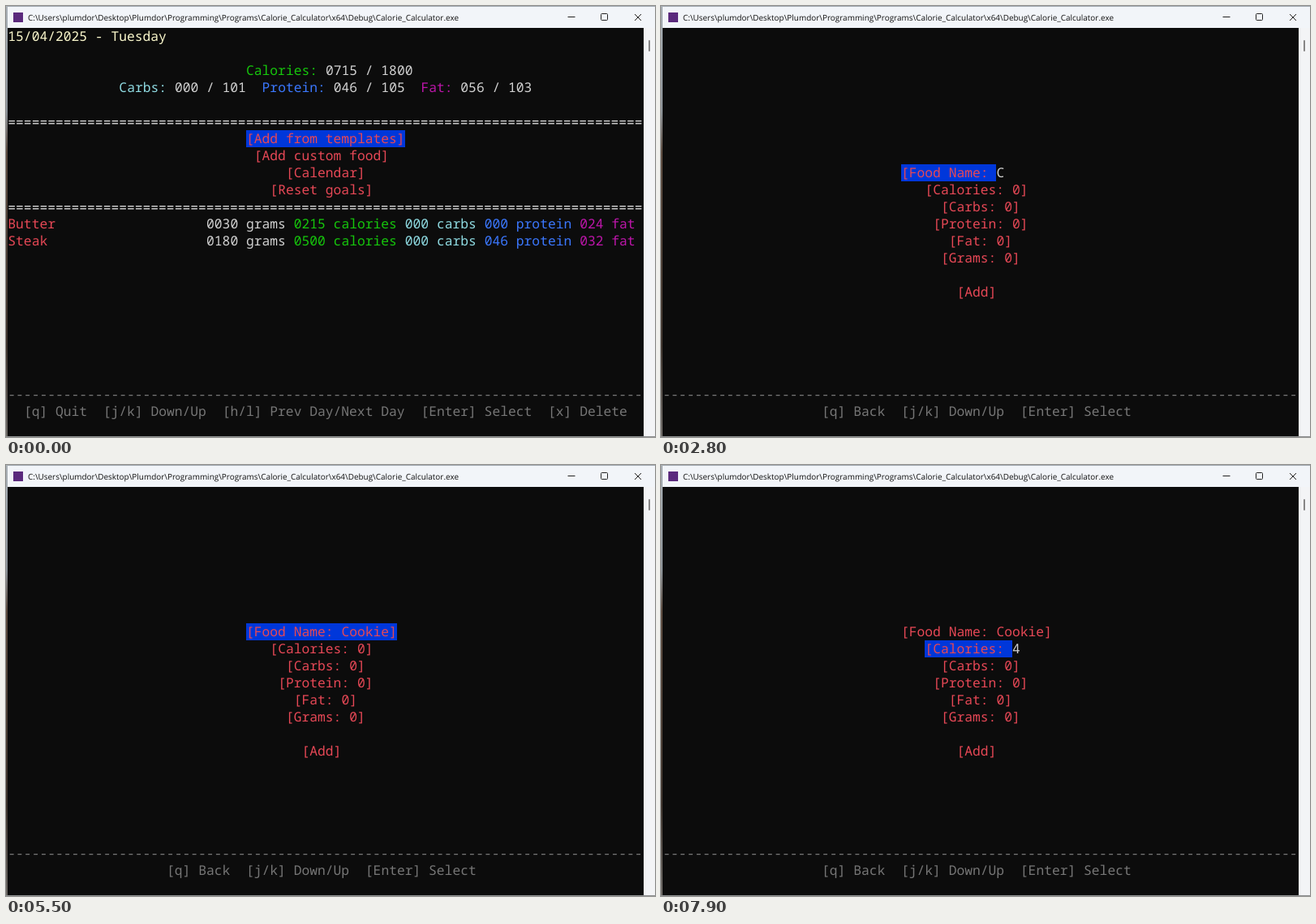
An HTML page for the animation above (8 s loop, 800 px wide and 531 px high).

```html
<!DOCTYPE html>
<html lang="en">
<head>
<meta charset="utf-8">
<title>Calorie calculator</title>
<style>
  html, body { margin: 0; width: 100%; height: 100%; overflow: hidden; }
  body { position: relative; background: #f3f4f6; text-rendering: geometricPrecision; }

  /* window frame */
  .frame, .frame * { position: absolute; }
  .caption { left: 0; top: 0; width: 800px; height: 27px; background: #f2f5f9; }
  .top { left: 0; top: 0; width: 800px; height: 1px; background: #a3abb2; }
  .left { left: 0; top: 0; width: 2px; height: 531px;
    background: linear-gradient(#a9b0b6, #8b9196 130px, #5b4a3e 180px, #3d332c 420px, #6d6a66); }
  .bottom { left: 0; top: 530px; width: 800px; height: 1px; background: #8d8f90; }
  .icon { left: 9px; top: 8px; width: 12px; height: 12px; background: #5b2a7d; }
  .path { left: 27px; top: 5px; font: 9.95px/18px "Open Sans", sans-serif; color: #111; white-space: pre; }
  .thumb { left: 792px; top: 42px; width: 2px; height: 14px; border-radius: 1px; background: #868686; }
  .buttons { left: 0; top: 0; fill: none; stroke: #222; }

  /* terminal: an 80-column grid */
  .term { --w: 9.79px; --h: 21px; position: absolute; left: 2px; top: 27px; width: 784px; height: 503px;
    overflow: hidden; background: #0c0c0c; color: #d2d2d2;
    font: 16.3167px/21px "Noto Sans Mono", "DejaVu Sans Mono", monospace; }
  .term section { position: absolute; inset: 0; }
  .term p, .bar { position: absolute; margin: 0; height: var(--h); white-space: pre;
    left: calc(.3px + var(--c, 0) * var(--w)); top: calc(var(--r) * var(--h)); }
  .bar { width: calc(var(--n) * var(--w)); background: #0037da; }
  .term .rule { margin-top: 1px; color: #e6e6e6; }
  .red { color: #e74856; }
  .green { color: #16c60c; }
  .cyan { color: #8fdbe2; }
  .blue { color: #3b78ff; }
  .pink { color: #bd16aa; }
  .gold { color: #fbf8cc; }
  .dim { color: #767676; }

  /* timeline */
  .day, .form, .bar, .typed, .empty, .close, .zero, .digit { animation: 8s step-end infinite; }
  .day { animation-name: day; }
  .form { animation-name: form; }
  .day .bar { animation-name: menu; }
  .form .bar { animation-name: field; }
  .typed { animation-name: type; overflow: hidden; }
  .empty { animation-name: empty; }
  .close { animation-name: close; }
  .zero { animation-name: zero; }
  .digit { animation-name: digit; }

  @keyframes day { 0% { opacity: 1 } 12.5%, 100% { opacity: 0 } }
  @keyframes form { 0% { opacity: 0 } 12.5%, 100% { opacity: 1 } }
  @keyframes menu {
    0% { --c: 30; --r: 6; --n: 20 }
    1.25%, 100% { --c: 31; --r: 7; --n: 17 }
  }
  @keyframes field {
    0% { --c: 30; --r: 8; --n: 20 }
    25% { --c: 30; --r: 8; --n: 12 }
    63.75% { --c: 30; --r: 8; --n: 19 }
    71.25% { --c: 33; --r: 9; --n: 13 }
    83.75%, 100% { --c: 33; --r: 9; --n: 11 }
  }
  @keyframes type {
    0% { width: 0; color: #d2d2d2 }
    31.25% { width: calc(1 * var(--w)); color: #d2d2d2 }
    38.75% { width: calc(2 * var(--w)); color: #d2d2d2 }
    43.75% { width: calc(3 * var(--w)); color: #d2d2d2 }
    50% { width: calc(4 * var(--w)); color: #d2d2d2 }
    53.75% { width: calc(5 * var(--w)); color: #d2d2d2 }
    57.5% { width: calc(6 * var(--w)); color: #d2d2d2 }
    63.75%, 100% { width: calc(6 * var(--w)); color: #e74856 }
  }
  @keyframes empty { 0% { opacity: 1 } 25%, 100% { opacity: 0 } }
  @keyframes close { 0% { opacity: 0 } 63.75%, 100% { opacity: 1 } }
  @keyframes zero { 0% { opacity: 1 } 83.75%, 100% { opacity: 0 } }
  @keyframes digit { 0% { opacity: 0 } 92.5%, 100% { opacity: 1 } }
</style>
</head>
<body>
<div class="frame">
  <div class="caption"></div>
  <div class="top"></div>
  <div class="left"></div>
  <div class="bottom"></div>
  <div class="icon"></div>
  <div class="path">C:\Users\plumdor\Desktop\Plumdor\Programming\Programs\Calorie_Calculator\x64\Debug\Calorie_Calculator.exe</div>
  <svg class="buttons" width="800" height="27">
    <path d="M692.5 13.5h9"/>
    <rect x="733.5" y="9.5" width="8" height="8" rx="1"/>
    <path d="M775 10l8 8m0-8l-8 8"/>
  </svg>
  <div class="thumb"></div>
</div>

<main class="term">
  <section class="day">
    <div class="bar"></div>
    <p class="gold" style="--r:0">15/04/2025 - Tuesday</p>

    <p class="green" style="--r:2;--c:30">Calories:</p>
    <p style="--r:2;--c:40">0715 / 1800</p>
    <p class="cyan" style="--r:3;--c:14">Carbs:</p>
    <p style="--r:3;--c:21">000 / 101</p>
    <p class="blue" style="--r:3;--c:32">Protein:</p>
    <p style="--r:3;--c:41">046 / 105</p>
    <p class="pink" style="--r:3;--c:52">Fat:</p>
    <p style="--r:3;--c:57">056 / 103</p>

    <p class="rule" style="--r:5">================================================================================</p>
    <p class="red" style="--r:6;--c:30">[Add from templates]</p>
    <p class="red" style="--r:7;--c:31">[Add custom food]</p>
    <p class="red" style="--r:8;--c:35">[Calendar]</p>
    <p class="red" style="--r:9;--c:33">[Reset goals]</p>
    <p class="rule" style="--r:10">================================================================================</p>

    <p class="red" style="--r:11">Butter</p>
    <p style="--r:11;--c:25">0030 grams</p>
    <p class="green" style="--r:11;--c:36">0215 calories</p>
    <p class="cyan" style="--r:11;--c:50">000 carbs</p>
    <p class="blue" style="--r:11;--c:60">000 protein</p>
    <p class="pink" style="--r:11;--c:72">024 fat</p>

    <p class="red" style="--r:12">Steak</p>
    <p style="--r:12;--c:25">0180 grams</p>
    <p class="green" style="--r:12;--c:36">0500 calories</p>
    <p class="cyan" style="--r:12;--c:50">000 carbs</p>
    <p class="blue" style="--r:12;--c:60">046 protein</p>
    <p class="pink" style="--r:12;--c:72">032 fat</p>

    <p class="dim" style="--r:22;--c:2">[q] Quit</p>
    <p class="dim" style="--r:22;--c:12">[j/k] Down/Up</p>
    <p class="dim" style="--r:22;--c:27">[h/l] Prev Day/Next Day</p>
    <p class="dim" style="--r:22;--c:52">[Enter] Select</p>
    <p class="dim" style="--r:22;--c:68">[x] Delete</p>
  </section>

  <section class="form">
    <div class="bar"></div>
    <p class="red" style="--r:8;--c:30">[Food Name: </p>
    <p class="red empty" style="--r:8;--c:42">&lt;empty&gt;]</p>
    <p class="typed" style="--r:8;--c:42">Cookie</p>
    <p class="red close" style="--r:8;--c:48">]</p>

    <p class="red" style="--r:9;--c:33">[Calories: </p>
    <p class="red zero" style="--r:9;--c:44">0]</p>
    <p class="digit" style="--r:9;--c:44">4</p>

    <p class="red" style="--r:10;--c:35">[Carbs: 0]</p>
    <p class="red" style="--r:11;--c:34">[Protein: 0]</p>
    <p class="red" style="--r:12;--c:36">[Fat: 0]</p>
    <p class="red" style="--r:13;--c:35">[Grams: 0]</p>
    <p class="red" style="--r:15;--c:37">[Add]</p>

    <p class="dim" style="--r:22;--c:20">[q] Back</p>
    <p class="dim" style="--r:22;--c:30">[j/k] Down/Up</p>
    <p class="dim" style="--r:22;--c:45">[Enter] Select</p>
  </section>

  <p class="dim" style="--r:21">--------------------------------------------------------------------------------</p>
</main>
</body>
</html>
```
